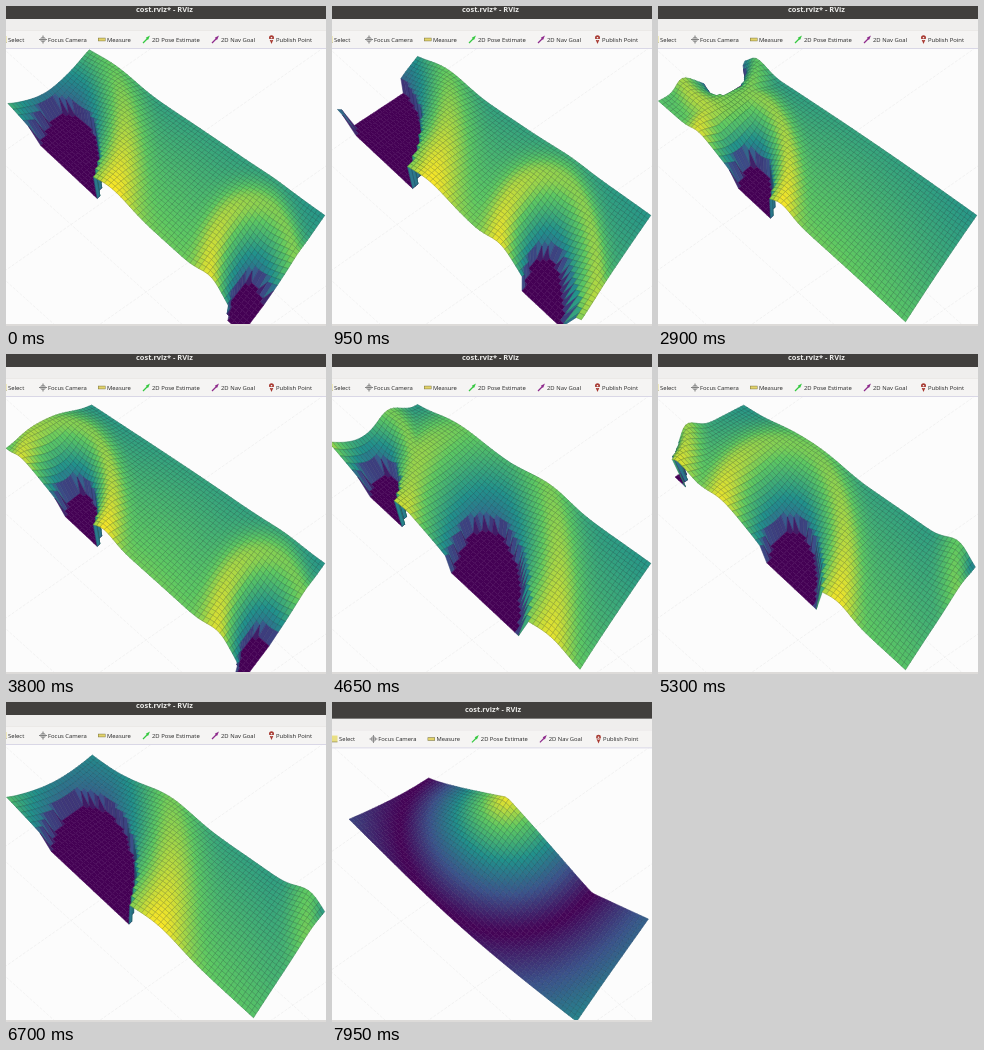
An HTML page with a canvas for the animation above (8 s loop, 320 by 320 pixels).

```html
<!DOCTYPE html>
<html lang="en">
<head>
<meta charset="utf-8">
<title>Cost surface</title>
<style>
  html, body { margin: 0; width: 100%; height: 100%; overflow: hidden; background: #fcfcfc; }
  canvas { display: block; width: 100vw; height: 100vh; }
</style>
</head>
<body>
<canvas id="stage" width="320" height="320"></canvas>
<script>
const ctx = document.getElementById('stage').getContext('2d');
const LOOP = 8000, STEP = 50, CUT = 7350;
const COLS = 62, ROWS = 28;

// Pits drift along the sheet: u runs along it, v from front to back, r is the radius along u.
const PITS = [
  [{ t: 0, u: .2, v: .05, r: .14 }, { t: 1800, u: .04, v: .35, r: .165 },
   { t: 2900, u: .01, v: .72, r: .08 }, { t: 3600, u: -.25, v: .9, r: .04 }],
  [{ t: 0, u: 1, v: .06, r: .09 }, { t: 1800, u: .76, v: .03, r: .1 }, { t: 2900, u: .36, v: .03, r: .085 },
   { t: 4650, u: .16, v: .05, r: .085 }, { t: 6200, u: -.3, v: .05, r: .06 }],
  [{ t: 3300, u: 1.3, v: .05, r: .06 }, { t: 4650, u: .61, v: .05, r: .155 },
   { t: 5950, u: .43, v: .03, r: .08 }, { t: 6700, u: .29, v: .08, r: .19 }],
  [{ t: 4900, u: 1.3, v: 1, r: .06 }, { t: 5950, u: .9, v: .85, r: .17 }, { t: 6700, u: 1.2, v: .95, r: .12 }]
];
const PIT_ASPECT = 3.4, PIT_TILT = .22;

// Floor and full-height positions of the corners: left, back, front, right.
const FLOOR = [[17, 123], [93, 73], [236, 328], [312, 227]];
const PEAK = [[-6, 84], [79, 31], [252, 311], [325, 193]];
const VIRIDIS = [[68, 1, 84], [59, 82, 139], [33, 145, 140], [94, 201, 98], [253, 231, 37]];

const mix = (a, b, k) => a + (b - a) * k;
const clamp = x => Math.max(0, Math.min(1, x));

function colour(z) {
  const p = clamp(z) * 4, i = Math.min(3, Math.floor(p));
  return `rgb(${VIRIDIS[i].map((c, n) => Math.round(mix(c, VIRIDIS[i + 1][n], p - i)))})`;
}

function pitAt(path, t) {
  const next = path.findIndex(key => key.t > t);
  if (next === 0) return path[0];
  if (next < 0) return path[path.length - 1];
  const from = path[next - 1], to = path[next], k = (t - from.t) / (to.t - from.t);
  return { u: mix(from.u, to.u, k), v: mix(from.v, to.v, k), r: mix(from.r, to.r, k) };
}

// Every pit is ringed by a basin and, at about twice its radius, a ridge.
function pittedHeight(u, v, pits) {
  let z = .72 - .2 * v + .06 * Math.sin(Math.PI * u);
  let ridge = 0, dip = 1;
  for (const pit of pits) {
    const dv = v - pit.v;
    const x = (u - pit.u + PIT_TILT * dv) / pit.r, y = dv / (pit.r * PIT_ASPECT);
    const d = Math.hypot(x, y);
    if (d < 1) return 0;
    const slope = clamp(.5 + (y - x) / (2 * d));
    ridge = Math.max(ridge, Math.exp(-(((d - mix(1.6, 2.2, slope)) / .6) ** 2)));
    dip *= 1 - mix(.1, .5, slope) * Math.exp((1 - d) * 2);
  }
  return Math.min(1, (z + .25 * ridge) * dip);
}

// A single cone on the back edge, with the land rising again beyond its foot.
function coneHeight(u, v) {
  const d = Math.hypot((u - .38) / .38, 1 - v);
  return d < 1 ? (1 - d) ** 1.15 : .5 * (d - 1);
}

function place([left, back, front, right], u, v, axis) {
  return mix(mix(left[axis], front[axis], u), mix(back[axis], right[axis], u), v);
}

function drawSurface(t) {
  const pits = PITS.map(path => pitAt(path, t));
  const height = t < CUT ? (u, v) => pittedHeight(u, v, pits) : coneHeight;
  const points = [];
  for (let j = 0; j <= ROWS; j++) {
    points.push([]);
    for (let i = 0; i <= COLS; i++) {
      const u = i / COLS, v = j / ROWS, z = height(u, v);
      const [x, y] = [0, 1].map(axis => mix(place(FLOOR, u, v, axis), place(PEAK, u, v, axis), z));
      points[j].push({ x, y, z });
    }
  }
  ctx.lineWidth = .5;
  for (let j = ROWS - 1; j >= 0; j--) {
    for (let i = 0; i < COLS; i++) {
      const cell = [points[j][i], points[j][i + 1], points[j + 1][i + 1], points[j + 1][i]];
      const mean = cell.reduce((sum, p) => sum + p.z, 0) / 4;
      ctx.beginPath();
      cell.forEach(p => ctx.lineTo(p.x, p.y));
      ctx.closePath();
      ctx.fillStyle = ctx.strokeStyle = colour(mean);
      ctx.fill();
      ctx.stroke();
      ctx.strokeStyle = `rgba(10,25,30,${.36 * clamp(mean * 2)})`;
      ctx.stroke();
    }
  }
}

function line(x1, y1, x2, y2, stroke, width = 1) {
  ctx.strokeStyle = stroke;
  ctx.lineWidth = width;
  ctx.beginPath();
  ctx.moveTo(x1, y1);
  ctx.lineTo(x2, y2);
  ctx.stroke();
}

function bar(y, h, fill) {
  ctx.fillStyle = fill;
  ctx.fillRect(-10, y, 350, h);
}

function drawFloorGrid() {
  ctx.setLineDash([3, 1.5]);
  for (let n = -2; n < 4; n++) {
    line(-100, 185 + n * 115, 340, 581 + n * 115, '#eeeeee', .7);
    line(-20, 278 + n * 120, 340, 26 + n * 120, '#ececec', .7);
  }
  ctx.setLineDash([]);
}

function label(text, x) {
  ctx.fillStyle = '#222';
  ctx.fillText(text, x, 36);
}

function arrow(x, fill) {
  line(x, 37, x + 5, 32, fill, 1.2);
  ctx.fillStyle = fill;
  ctx.beginPath();
  ctx.moveTo(x + 7, 29.5);
  ctx.lineTo(x + 2.8, 31.8);
  ctx.lineTo(x + 5, 34);
  ctx.fill();
}

function drawWindow() {
  bar(-10, 23, '#413f3d');
  bar(13, 12, '#efeeed');
  bar(24, 18, '#f5f4f3');
  line(-10, 24.5, 340, 24.5, '#e4e2e0', .6);
  line(-10, 42.5, 340, 42.5, '#d9d7e6', 1);

  ctx.font = 'bold 7.45px "Open Sans", sans-serif';
  ctx.fillStyle = '#eeeeec';
  ctx.fillText('cost.rviz* - RViz', 130, 6.2);

  ctx.font = '5.9px "Open Sans", sans-serif';
  label('Select', 2);
  label('Focus Camera', 42);
  label('Measure', 101);
  label('2D Pose Estimate', 146);
  label('2D Nav Goal', 215);
  label('Publish Point', 270);

  ctx.fillStyle = '#e9df83';
  ctx.fillRect(-6, 30, 6.5, 6.5);
  line(-6, 36.5, .5, 36.5, '#77723f', .6);

  line(33, 33.5, 41, 33.5, '#777', .9);
  line(37, 29.5, 37, 37.5, '#777', .9);
  ctx.strokeStyle = '#888';
  ctx.beginPath();
  ctx.arc(37, 33.5, 2.3, 0, Math.PI * 2);
  ctx.stroke();

  line(92, 33.5, 99.5, 33.5, '#777240', 3.4);
  line(92.5, 33.5, 99, 33.5, '#e2d36a', 2.4);
  arrow(137, '#35c840');
  arrow(206, '#8e2a8c');

  ctx.fillStyle = '#a83a32';
  ctx.beginPath();
  ctx.arc(265.5, 31.8, 2.5, 0, Math.PI * 2);
  ctx.moveTo(263.3, 33);
  ctx.lineTo(265.5, 38);
  ctx.lineTo(267.7, 33);
  ctx.fill();
  ctx.fillStyle = '#eee';
  ctx.fillRect(264.8, 31, 1.4, 1.4);
}

function draw(now) {
  const t = Math.floor(now % LOOP / STEP) * STEP;
  ctx.setTransform(1, 0, 0, 1, 0, 0);
  ctx.fillStyle = '#fcfcfc';
  ctx.fillRect(0, 0, 320, 320);
  if (t >= CUT) ctx.setTransform(.985, 0, 0, .985, 5, 4);
  drawFloorGrid();
  drawSurface(t);
  drawWindow();
  ctx.setTransform(1, 0, 0, 1, 0, 0);
  bar(318, 2, '#dddbd9');
}

const start = performance.now();
function tick() {
  draw(performance.now() - start);
  requestAnimationFrame(tick);
}
tick();
</script>
</body>
</html>
```
